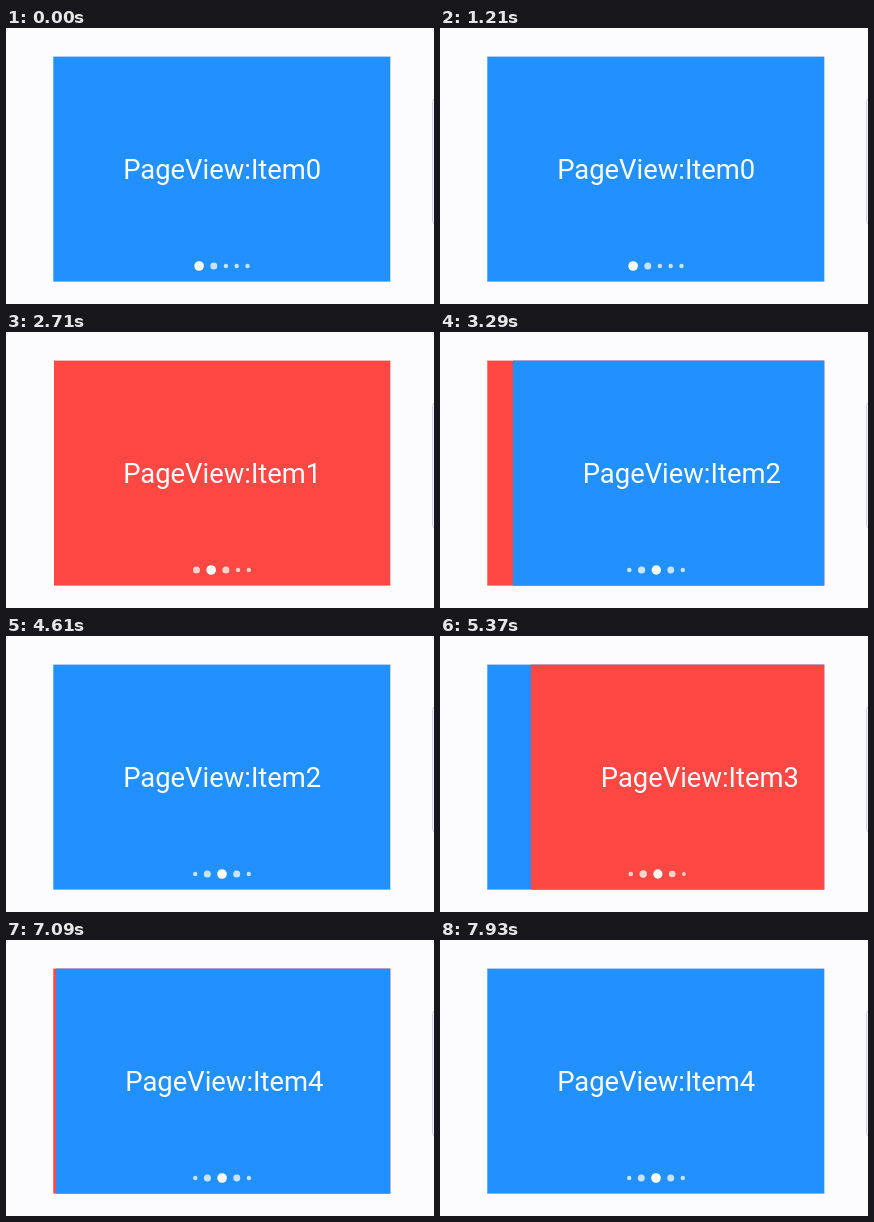
These frames come from a looping animation (428x276 px, 8000 ms). An HTML page with a canvas:

```html
<!DOCTYPE html>
<html lang="en">
<head>
<meta charset="utf-8">
<title>PageView</title>
<style>
html, body { margin: 0; height: 100%; overflow: hidden; background: #fcfcff; }
canvas { display: block; }
</style>
</head>
<body>
<canvas id="stage" width="428" height="276"></canvas>
<script>
const ctx = document.getElementById('stage').getContext('2d');
const LOOP = 8000;
const VIEW = { x: 47.3, y: 28.6, w: 337, h: 225 };
const COLORS = ['#2390ff', '#ff4844'];
const SWIPES = [1363, 2820, 4960, 6347];
const DRAG = { time: 0.2, distance: 110 };
const DOT = { sizes: [9.6, 7, 4.4], gap: 6.4, y: 238, shown: 5 };

const clamp = (v, lo, hi) => Math.min(hi, Math.max(lo, v));
const lerp = (a, b, k) => a + (b - a) * k;

// Distance scrolled s seconds after touch: accelerating drag, then an overdamped spring.
function swipeOffset(s) {
  if (s <= 0) return 0;
  if (s < DRAG.time) return DRAG.distance * (s / DRAG.time) ** 2;
  const slow = 9.07, fast = 22.03;
  const rest = VIEW.w - DRAG.distance;
  const speed = 2 * DRAG.distance / DRAG.time;
  const a = (fast * rest - speed) / (fast - slow);
  const u = s - DRAG.time;
  const left = a * Math.exp(-slow * u) + (rest - a) * Math.exp(-fast * u);
  return left < 0.3 ? VIEW.w : VIEW.w - left;
}

function circle(x, y, r) {
  ctx.beginPath();
  ctx.arc(x, y, r, 0, Math.PI * 2);
  ctx.fill();
}

function drawPage(index, x) {
  const left = x > VIEW.x ? Math.ceil(x) : VIEW.x;
  ctx.fillStyle = COLORS[index % 2];
  ctx.fillRect(left, VIEW.y, VIEW.x + VIEW.w - left, VIEW.h);
}

function drawLabel(index, x) {
  ctx.fillStyle = '#fcfcff';
  ctx.font = '27.4px Roboto, sans-serif';
  ctx.textAlign = 'center';
  ctx.fillText('PageView:Item' + index, x + VIEW.w / 2 + 0.4, 151);
}

// A centred row whose window follows the current page once it passes the middle.
function drawDots(position) {
  const start = Math.max(0, position - 2);
  const first = Math.floor(start);
  const dots = [];
  for (let i = first; i <= first + DOT.shown; i++) {
    const presence = clamp(i - start + 1, 0, 1) * clamp(start + DOT.shown - i, 0, 1);
    const distance = Math.min(Math.abs(i - position), 2);
    const k = Math.min(Math.floor(distance), 1);
    const size = lerp(DOT.sizes[k], DOT.sizes[k + 1], distance - k) * presence;
    dots.push({ size, gap: DOT.gap * presence, alpha: lerp(1, 0.75, Math.min(distance, 1)) });
  }
  const width = dots.reduce((sum, d) => sum + d.size + d.gap, 0) - DOT.gap;
  let x = 216 - width / 2;
  for (const { size, gap, alpha } of dots) {
    ctx.fillStyle = `rgba(255, 255, 248, ${alpha})`;
    circle(x + size / 2, DOT.y, size / 2);
    x += size + gap;
  }
}

function drawTouch(t) {
  for (const start of SWIPES) {
    const s = (t - start) / 1000;
    if (s < -0.03 || s > DRAG.time) continue;
    ctx.fillStyle = 'rgba(248, 235, 222, 0.64)';
    ctx.strokeStyle = 'rgba(120, 85, 135, 0.7)';
    circle(296 - swipeOffset(s), 198, 10.2);
    ctx.stroke();
  }
}

function draw(t) {
  ctx.fillStyle = '#fcfcff';
  ctx.fillRect(0, 0, 428, 276);

  ctx.lineWidth = 1;
  ctx.strokeStyle = '#cdc4ee';
  ctx.beginPath();
  ctx.roundRect(426.7, 70.5, 40, 126, 3);
  ctx.stroke();

  const scroll = SWIPES.reduce((sum, start) => sum + swipeOffset((t - start) / 1000), 0);
  const position = scroll / VIEW.w;
  const page = Math.floor(position);
  const pageX = index => VIEW.x + index * VIEW.w - scroll;
  const visible = position > page ? [page, page + 1] : [page];

  ctx.save();
  for (const i of visible) drawPage(i, pageX(i));
  ctx.beginPath();
  ctx.rect(VIEW.x, VIEW.y, VIEW.w, VIEW.h);
  ctx.clip();
  for (const i of visible) drawLabel(i, pageX(i));
  ctx.restore();

  drawDots(position);
  drawTouch(t);
}

function tick() {
  draw(performance.now() % LOOP);
  requestAnimationFrame(tick);
}
tick();
</script>
</body>
</html>
```
